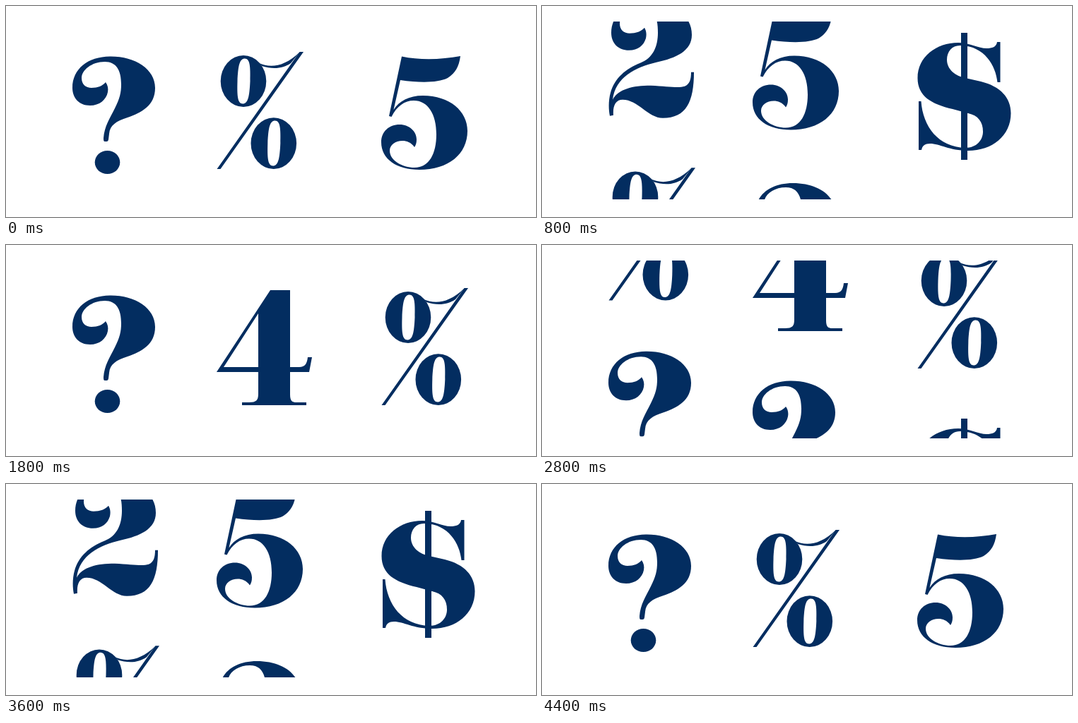
These frames come from a looping animation (750x299 px, 4.6 s). An HTML page with a canvas:

```html
<!DOCTYPE html>
<html lang="en">
<head>
<meta charset="utf-8">
<title>Rolling glyphs</title>
<style>
  html, body { margin: 0; width: 100%; height: 100%; overflow: hidden; background: #fff; }
  canvas { display: block; width: 750px; height: 299px; }
</style>
</head>
<body>
<canvas id="stage"></canvas>
<script>
const W = 750, H = 299;
const INK = '#032d60';
const VIEW = { top: 22, bottom: 274 };
const TICK = 200;     // ms per step
const TICKS = 23;     // steps per loop
const TRAVEL = 9;     // steps to roll from one end to the other

// Bowl of an old-style zero, with its narrow slanted counter.
function zero(cx, cy) {
  const slot = new Path2D(
    'M1.5-32C9-32 9.5-20 9 0C8 22 6 32-1.5 32C-9 32-9.5 20-9 0C-8-22-6-32 1.5-32Z');
  const p = new Path2D();
  p.ellipse(cx, cy, 32.3, 36.4, 0, 0, Math.PI * 2);
  p.addPath(slot, new DOMMatrix([1, 0, 0, 1, cx + 0.5, cy]));
  return p;
}

function dot(cx, cy, rx, ry) {
  const p = new Path2D();
  p.ellipse(cx, cy, rx, ry, 0, 0, Math.PI * 2);
  return p;
}

// Each glyph is a list of parts, measured from its top left corner.
const glyphs = {
  '?': [
    new Path2D(`M44 116C45 100 53 88 60 74C67 60 69 52 69 40C69 20 62 8 46 8
      C27 8 13 20 13 31C13 40 19 45 27 45C36 45 43 42 47 37C50 41 51 46 50 51
      C48 62 38 70 25 70C9 70 0 59 0 45C0 18 22 .8 53 .5C88 0 117 18 117 45
      C117 70 98 80 78 87C62 92 53 98 52 110L51 118C50.5 121 49 121 47.5 121
      L46 121C44 121 44 119 44 116Z`),
    dot(49.5, 150.5, 17.8, 16.5)
  ],
  '2': [
    new Path2D(`M4 42C4 17 25 0 57 0C93 0 118 18 118 45C118 68 96 78 68 84
      C38 91 10 105 6 137C14 122 34 117 60 117C84 118 99 121 108 118
      C115 115 117 108 117 98L121 98C121 140 110 163 77 163
      C56 163 42 137 20 137C10 137 6 146 7 159L2 160C0 150 0 138 3 127
      C9 106 25 93 45 85C63 78 70 62 70 42C70 19 64 6 47 6
      C29 6 16 17 16 29C16 38 22 43 30 43C39 43 47 40 51 35
      C54 40 54 45 53 50C50 60 42 67 29 67C14 67 4 57 4 42Z`)
  ],
  '5': [
    new Path2D(`M29 .5C55 6 85 5 112 0C110 15 105 24 94 31C80 38 55 38 27 34L17.5 76
      C25 64 39 56 59 56C97 56 122 78 122 106C122 139 95 161 54 161
      C22 161 0 146 0 122C0 107 11 97 26 97C40 97 50 107 50 118
      C50 123 49 126 47 129C42 122 36 120 30 120C20 120 12 126 12 134
      C12 148 30 158 47 158C68 158 78 138 78 111C78 82 66 63 46 63
      C33 63 22 71 14.5 86L11 85Z`)
  ],
  '4': [
    new Path2D(`M0 116L76 0L104 0L104 109L117 109C125 109 128 104 129 95L135 95L131 116
      L104 116L104 148C104 157 107 159 113 159L127 159L127 163L36 163L36 159L46 159
      C56 159 59 156 59 147L59 116ZM10 109L59 109L59 33Z`)
  ],
  '%': [
    zero(38, 41.5),
    zero(80.8, 129.6),
    new Path2D('M.5 166L5.5 166L123 0L117.5 0Z'),
    new Path2D('M60 16C76 23 95 22 118 0L105 16C94 24 79 25 64 20Z')
  ],
  '$': [
    new Path2D(`M.5 64C.5 34 27 14 58 14C73 14 87 22 98 22C106 22 112 20 113 13
      L117.5 13L117.5 70L113.5 70C111 46 95 19 62 18C50 17 42 26 42 38
      C42 52 54 61 68 64L90 69C118 76 132.5 92 132.5 114C132.5 146 106 167 72 167
      C45 167 32 157 18 157C11 157 7 160 6 166L2 166L2 97L5.5 97
      C8 133 30 162 68 163C84 163 93 152 93 140C93 126 86 117 72 114
      L50 108C20 101 .5 90 .5 64Z`),
    new Path2D('M62 0H71V180H62Z')
  ]
};

// Reels: left edge, shift per step, and the resting top of each glyph.
const reels = [
  { x: 94, step: -79.2, items: [['?', 71], ['2', 312.5], ['%', 546.1], ['?', 783.8]] },
  { x: 298, step: 105, items: [['%', 65], ['2', -169], ['5', -405.5], ['?', -648], ['4', -881]] },
  { x: 531, step: 52, items: [['5', 71], ['$', -170], ['%', -407]] }
];

const canvas = document.getElementById('stage');
const ctx = canvas.getContext('2d');
const scale = window.devicePixelRatio || 1;
canvas.width = W * scale;
canvas.height = H * scale;

function drawGlyph(name, x, y) {
  if (y > VIEW.bottom || y + 180 < VIEW.top) return;
  ctx.save();
  ctx.translate(x, y);
  for (const part of glyphs[name]) ctx.fill(part, 'evenodd');
  ctx.restore();
}

function draw(time) {
  const tick = Math.floor(time / TICK) % TICKS;
  // Roll out, rest, roll back.
  const pos = Math.min(tick, TRAVEL, TICKS - 1 - tick);

  ctx.setTransform(scale, 0, 0, scale, 0, 0);
  ctx.fillStyle = '#fff';
  ctx.fillRect(0, 0, W, H);
  ctx.save();
  ctx.beginPath();
  ctx.rect(0, VIEW.top, W, VIEW.bottom - VIEW.top);
  ctx.clip();
  ctx.fillStyle = INK;
  for (const { x, step, items } of reels) {
    for (const [name, top] of items) drawGlyph(name, x, top + step * pos);
  }
  ctx.restore();
}

const start = performance.now();
function loop() {
  draw(performance.now() - start);
  requestAnimationFrame(loop);
}
loop();
</script>
</body>
</html>
```
